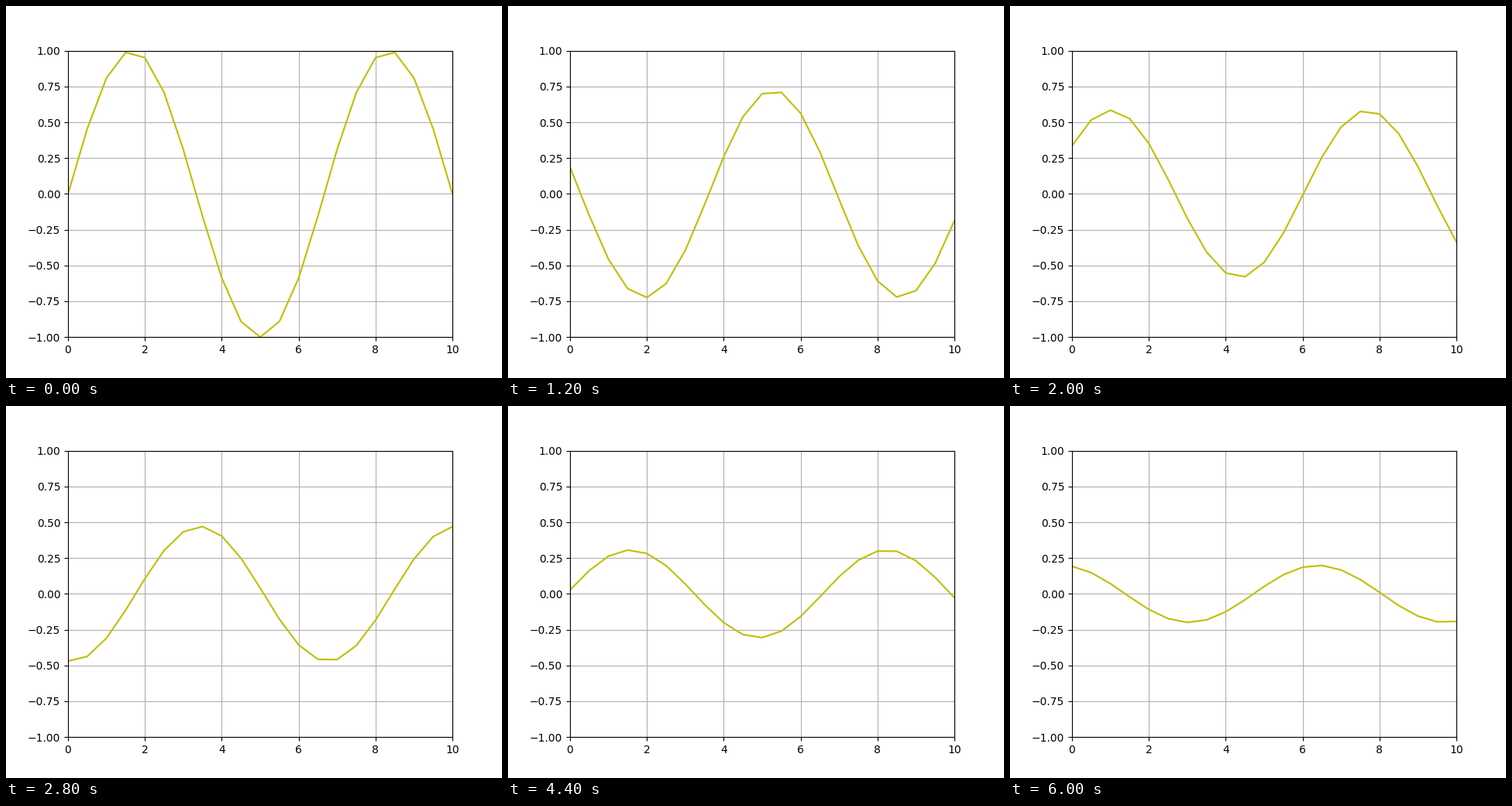
Write a matplotlib script that moves like this. It is 640 px wide and 480 px high and loops after 6.1 s.

```python
import numpy as np
import matplotlib.pyplot as plt
from matplotlib.animation import FuncAnimation

LENGTH = 10.0
STEP = 0.5
COURANT = 0.6
FRAMES = 61
INTERVAL = 100

x = np.linspace(0, LENGTH, int(LENGTH / STEP) + 1)
k = 3 * np.pi / LENGTH

# Per-step amplification of one harmonic under the upwind scheme:
# its modulus damps the wave, its argument moves it to the right.
gain = 1 - COURANT + COURANT * np.exp(-1j * k * STEP)


def wave(n):
    return np.imag(gain ** n * np.exp(1j * k * x))


fig, ax = plt.subplots(figsize=(6.4, 4.8), dpi=100)
ax.set_xlim(0, LENGTH)
ax.set_ylim(-1, 1)
ax.grid(True)
line, = ax.plot(x, wave(0), color="y", linewidth=1.5)


def update(n):
    line.set_ydata(wave(n))
    return line,


anim = FuncAnimation(fig, update, frames=FRAMES, interval=INTERVAL,
                     repeat=True, repeat_delay=0)
plt.show()
```
